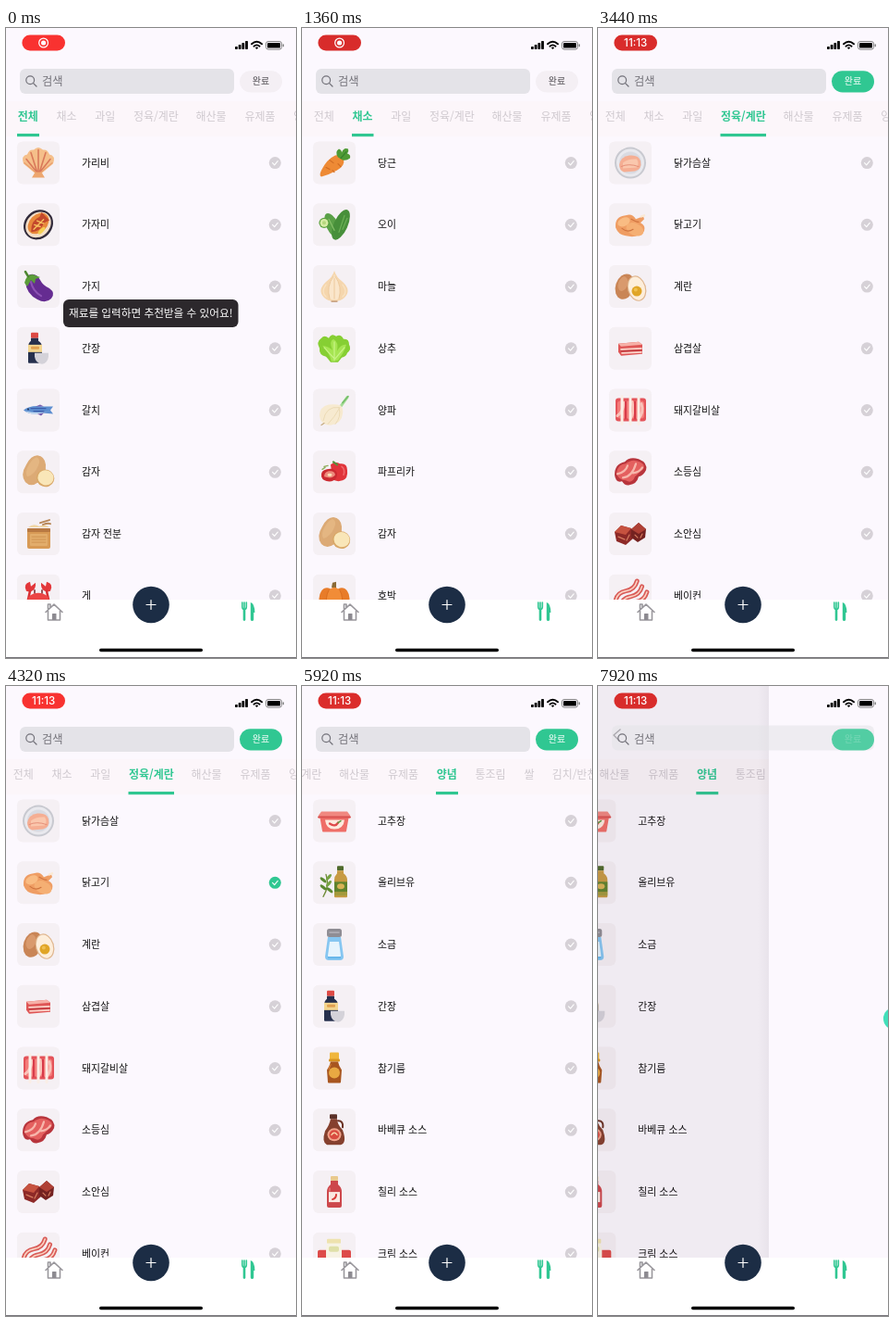
An HTML page that plays this animation: 314x680 px, repeating every 8 s.

```html
<!DOCTYPE html>
<html lang="ko">
<head>
<meta charset="utf-8">
<style>
html, body { margin: 0; width: 100%; height: 100%; overflow: hidden; background: #fcf8fe; }
svg { display: block; width: 100vw; height: 100vh; }
text { font-family: "Noto Sans CJK KR", "Noto Sans CJK", "Noto Sans", sans-serif; }
</style>
</head>
<body>
<svg id="stage" viewBox="0 0 314 680"></svg>
<script>
const LOOP = 8000, STEP = 80, W = 314, ROW = 66.75;
const GREEN = '#30c792', PAGE = '#fcf8fe', GREY = '#d6d1d7', TAB = '#cfc9cf';

const path = (d, fill) => `<path d="${d}" fill="${fill}"/>`;
const line = (d, color, w = 1) =>
  `<path d="${d}" fill="none" stroke="${color}" stroke-width="${w}" stroke-linecap="round" stroke-linejoin="round"/>`;
const oval = (x, y, rx, ry, fill, turn = 0) =>
  `<ellipse rx="${rx}" ry="${ry}" fill="${fill}" transform="translate(${x} ${y}) rotate(${turn})"/>`;
const rect = (x, y, w, h, r, fill) =>
  `<rect x="${x}" y="${y}" width="${w}" height="${h}" rx="${r}" fill="${fill}"/>`;
const text = (x, y, size, str, fill, more = '') =>
  `<text x="${x}" y="${y}" font-size="${size}" fill="${fill}" ${more}>${str}</text>`;
const group = (body, more = '') => `<g ${more}>${body}</g>`;
const turn = (deg, body) => group(body, `transform="rotate(${deg})"`);

// Each icon is drawn around its own centre, about 34 px wide.
const icons = {
  scallop: path('M-6 15L-4 11L-16 1Q-19-8-12-9Q-10-15-5-14Q0-19 5-14Q10-15 12-9Q19-8 16 1L4 11L6 15Z', '#f5bf8a') +
    line('M-1 11L-13-4M-1 11L-8-11M0 11V-14M1 11L8-11M1 11L13-4', '#d9795a', 1.6) +
    line('M-3 10L-15 0M3 10L15 0', '#e79a69', 1.2) + path('M-7 16L-3 10H3L7 16Z', '#eda66f'),
  flounder: turn(-45, oval(0, 0, 17, 15, '#322b3b') + oval(0, 0, 15, 12.5, '#f4dfc9') +
    oval(1, -1, 13, 9.5, '#e8893c') + path('M-11 0Q-3-9 7-5L12-7V5L6 3Q-4 7-11 0', '#c3482c') +
    line('M-7 0H8M-3-3L0 3M2-4L5 3', '#f7c25f', 1.4) + oval(-2, 7, 5, 2, '#f5cf56')),
  eggplant: path('M-11-12Q-3-16 2-7Q5-1 12 2Q19 7 14 13Q8 19-1 14Q-13 8-14-5Z', '#652c91') +
    line('M-8-5Q-6 5 3 10', '#8d52b4', 2.2) + path('M-15-4Q-13-13-6-13L2-10L-3-8L-4-3L-8-7L-12 0Z', '#5b9d39') +
    line('M-11-11L-14-16', '#4c862f', 2.6),
  soy: rect(-8, -17, 8, 6, 1, '#dd4a45') + path('M-8-11H0V-8Q4-6 4-1V15Q4 16 3 16H-10Q-11 16-11 15V-1Q-11-6-8-8Z', '#26304d') +
    rect(-11, -4, 15, 8, 0, '#f3d58f') + rect(-8, -2, 9, 3, 1, '#e0a050') +
    path('M-4 5H11V9Q10 16 4 17Q-3 16-4 9Z', '#d4d2d9'),
  fish: path('M-16 0Q-9-6 5-4L16-4L13 0L16 4L4 3Q-9 6-16 0', '#5d8fd0') +
    path('M-14 1Q0 4 13 1L4 3Q-8 6-14 1', '#c6dcf0') + line('M-8-2H8M-5 1H6', '#3d5eaa', 1.2) +
    path('M-3-4L2-6L6-4ZM-1 4L3 6L6 3Z', '#775fae') + oval(-11, -1, 1, 1, '#1f3157'),
  potato: path('M-1-18Q7-17 8-8Q9 4 0 11Q-8 17-14 11Q-20 3-13-8Q-8-18-1-18', '#dcaa75') +
    path('M-2-16Q3-14 0-7Q-4 3-12 5Q-15 0-10-8Q-6-15-2-16', '#e4b682') +
    oval(7.5, 6.5, 9.8, 9.3, '#d9a868', 20) + oval(8, 6, 8.6, 8.1, '#f9e6b8', 20),
  starch: line('M2-12L12-15M5-10Q10-12 13-11', '#b88757', 2) + rect(-12, -6, 25, 22, 2, '#d89a55') +
    rect(-12, -6, 25, 4, 1, '#b87942') + rect(-9, 0, 19, 13, 1, '#e2ad6b') +
    line('M-7 3H8M-7 6H8M-7 9H8', '#c98c4c', .8) + path('M-11-7Q-5-12 1-8Q8-11 12-7Z', '#f1d7a6'),
  crab: path('M-13-5Q-17-13-9-15L-8-10L-3-14Q-2-6-9-4ZM13-5Q17-13 9-15L8-10L3-14Q2-6 9-4Z', '#e3373a') +
    line('M-9-5L-11 4M9-5L11 4M-11 8L-17 11M11 8L17 11', '#d52e33', 2.5) + oval(0, 5, 12, 8, '#ec4545') +
    line('M-4-3V-6M4-3V-6', '#7b2024', 1.5),
  carrot: path('M1-8Q8-10 10-4Q12 3 3 8Q-6 13-14 15Q-17 14-14 8Q-8-4 1-8', '#ee8a35') +
    line('M-5-3L-1 0M-9 5L-5 7M4 1L7 4M-2 8L0 10', '#d06b22', 1.1) +
    path('M4-6Q0-12 5-15Q8-14 8-11Q10-17 15-15Q16-13 14-10Q18-9 17-5Q13-2 9-3Z', '#4f9a35') + line('M7-5L13-12', '#36802a', 1.2),
  cucumber: oval(-2, 1, 6.5, 14.5, '#5aa047', -26) + oval(7, 0, 7.5, 17.5, '#478f3a', 24) +
    line('M11-10L5 8M14-7L9 5', '#6db057', 1.2) + line('M-6-6L0 6', '#86bf68', 1.2) + oval(-11, -2, 5.6, 5.6, '#5ba13f') +
    oval(-11, -2, 4.4, 4.4, '#d7eba5') + oval(-11, -2, 2, 2, '#b5d77d'),
  garlic: path('M0-17Q2-10 9-5Q19 4 11 12Q7 16 0 16Q-7 16-11 12Q-19 4-9-5Q-2-10 0-17', '#f5d6ad') +
    path('M0-13Q9-2 5 13Q0 16-5 13Q-9-2 0-13', '#fae6cb') + line('M-1-11Q-9 0-5 13M1-11Q9 0 5 13M0-9V13', '#ebc799', .9) +
    line('M-9-2Q-15 6-9 11M9-2Q15 6 9 11', '#f9e2c2', 1.3) + line('M-3 16H3', '#b98c65', 1.3),
  lettuce: path('M-4 15Q-7 11-9 9Q-17 7-16 0Q-20-7-14-11Q-11-15-6-11Q-3-17 2-13Q7-16 10-10Q16-11 16-4Q19 1 14 5Q13 9 8 10L4 15Z', '#86cf33') +
    path('M-3 14Q-6 4-13-3Q-6-2-2 2Q-6-8-1-10Q5-7 3 3Q7-5 13-4Q11 4 4 13Z', '#a6e552') +
    line('M0 13V-7M0 11L-11-1M1 11L11-1', '#c9f488', 1.2),
  onion: line('M6-3L14-14', '#a4dc96', 3) + line('M9-8L15-15', '#74bd68', 1.6) +
    path('M7-5Q10-1 9 4Q8 14-3 16Q-15 17-16 6Q-16-4-6-6Q2-7 7-5', '#f7ead0') +
    line('M5-3Q-9-5-12 11M6-3Q0 8-7 15M5-3Q8 7 1 15', '#ead9b2', .9) + line('M-11 14L-14 16', '#c5a97a', 1.2),
  pepper: path('M-4-8Q1-12 6-9Q14-10 14-2Q15 7 9 9Q3 11-2 8Z', '#e0343a') + line('M3-8L-1-11', '#55913b', 2.2) +
    line('M8-6Q12-3 10 3', '#f0686b', 1.6) + path('M-14 5Q-15-2-8-3Q0-5 3 1Q4 8-3 10Q-12 11-14 5', '#cb2a31') +
    path('M-11 5Q-11 0-6-1Q0-2 1 3Q-2 8-11 5', '#ee8a7c') + oval(-5, 3, 2.5, 1.7, '#fae2b8') +
    line('M-11-6L-7-7M-13-3L-10-5', '#8fae5c', 1.4),
  pumpkin: path('M-3-9L-2-14L2-15L2-8Z', '#8a6a35') + oval(-8, 3, 8.5, 11.5, '#e87c29') + oval(8, 3, 8.5, 11.5, '#e87c29') +
    oval(0, 3, 8, 12, '#f18c37') + line('M-6-6Q-11 3-7 12M6-6Q11 3 7 12', '#d96e20', .9),
  breast: oval(0, 0, 17, 17, '#c8c9d0') + oval(0, 0, 15, 15, '#e9e9ee') + oval(0, 0, 12, 12, '#d9dae1') +
    path('M-12 2Q-10-7-1-8Q9-9 11-2Q13 7 5 9L-7 10Q-12 8-12 2', '#f5ae93') +
    path('M-8 0Q-2-5 7-4Q10 1 7 5L-8 6Z', '#fac7ad') + line('M-10 4Q-2 0 9 4', '#e58f78', 1),
  chicken: path('M-16 3Q-17-9-5-10Q2-13 6-6L14-9L15-6L11-2Q17 1 15 7Q8 15-5 12Q-13 11-16 3', '#ef9d63') +
    oval(5, 5, 10, 6.5, '#f5af73', 25) + oval(-7, -3, 7, 4.5, '#f9bc83', -25) + line('M-9 4Q-3 9 3 5M1-6Q6-3 9-3', '#cf743f', 1.2) +
    line('M12-9L15-10', '#fbe9d4', 2.5),
  egg: oval(-6, 0, 10, 14, '#c98556', 18) + oval(-8, -3, 5, 8, '#d99a6d', 18) +
    oval(7, 2, 10, 14, '#e0b68f', -16) + oval(7, 2, 8.8, 12.8, '#fdeedb', -16) +
    oval(7, 5, 5.5, 5.5, '#e0a526') + oval(5.8, 3.5, 2, 2, '#f0c04f'),
  belly: path('M-13-5L9-7L13-4V6L-10 8L-13 4Z', '#df5656') + path('M-13-5L9-7L13-4L-10-2Z', '#f6b0a7') +
    line('M-10 1L12 0M-9 5L12 4', '#fbd5cb', 1.7) + line('M-10 3L12 2', '#bc383d', 1.2),
  ribs: rect(-16, -13, 33, 25, 3, '#e45359') + rect(-14, -10, 29, 19, 3, '#f47b79') +
    line('M-14 6Q-8 2-7-8M0 9Q5 3 2-9M9 9Q15 2 12-7', '#fac2b9', 3) + line('M-9-15V15M0-15V15M9-15V15', '#faeee6', 3) +
    line('M-5-9V9M5-9V9', '#d73a49', 2),
  sirloin: path('M-17 3Q-17-9-6-11Q-1-17 9-14Q19-10 17-2Q14 4 9 5Q7 13-1 14Q-6 15-9 10Q-16 12-17 3', '#b8353c') +
    path('M-15 1Q-13-9-5-9Q2-15 10-11Q17-8 14-3Q8 2 5 5Q2 13-5 9Q-13 9-15 1', '#e4605f') +
    line('M-14 2Q-5 0-3-7M-8 6Q2 5 6-9M3 1Q10 0 13-5', '#f7b6ab', 2.2),
  loin: path('M-17-2L-10-9L1-6L3 5L-5 12L-15 8Z', '#8d2927') + path('M-17-2L-10-9L1-6L-5 1Z', '#c6523f') +
    path('M1-5L9-12L17-5L16 4L8 9L1 4Z', '#742120') + path('M1-5L9-12L17-5L9 0Z', '#af4035') +
    line('M-13 3L-6 6M-1 1L-4 7M5 1L8 4M13 0L11 4', '#d67d60', 1.2),
  bacon: turn(-42, [-7, 1, 9].map(y => line(`M-15 ${y}Q-8 ${y - 5} 0 ${y}T16 ${y}`, '#d95c58', 5) +
    line(`M-15 ${y}Q-8 ${y - 5} 0 ${y}T16 ${y}`, '#fbd2c2', 1.6)).join('')),
  gochujang: path('M-16-6H16L13 11Q13 12 12 12H-12Q-13 12-13 11Z', '#ef6e67') + path('M-14-10H14L17-6V-3H-17V-6Z', '#f08880') +
    line('M-17-4H17', '#d9504e', 2) + path('M-10-1H11Q10 9 0 9Q-9 9-10-1', '#fdeade') +
    line('M-5 3Q1 7 4 2', '#e0494a', 2.4) + line('M4 2L7 0', '#5b9c42', 1.5),
  olive: line('M-12 15Q-5 4-9-9', '#6e8b36', 1.3) +
    [[-12, 5], [-6, 1], [-12, -3], [-6, -6], [-5, 8]].map(([x, y], i) => oval(x, y, 4.2, 1.6, i % 2 ? '#76a242' : '#5b8931', i % 2 ? -50 : 40)).join('') +
    rect(3, -18, 7, 5, 1, '#4f6a2b') + path('M3-13H10V-10Q14-7 14-3V15Q14 16 13 16H1Q0 16 0 15V-3Q0-7 3-10Z', '#c79a42') +
    rect(0, -1, 14, 11, 0, '#5f832d') + oval(7, 4, 4, 3, '#d8b356') + rect(0, 10, 14, 4, 0, '#a39a3d'),
  salt: path('M-7-8H7L10 13Q10 17 6 17H-6Q-10 17-10 13Z', '#86c6f1') + path('M-5-3H5L7 12Q7 14 5 14H-5Q-7 14-7 12Z', '#e6f4fd') +
    path('M-7 13H7V15H-7Z', '#62b4ea') + rect(-8, -17, 16, 9, 2.5, '#8f8d94') + line('M-5-13H5', '#b5b3ba', 1.5),
  sesame: rect(-5, -17, 10, 8, 1, '#f0b63c') + rect(-6, -10, 12, 3, 1, '#d79421') +
    path('M-4-7H4Q5-2 8 2L7 15Q7 16 6 16H-6Q-7 16-7 15L-8 2Q-5-2-4-7', '#a8561f') +
    oval(0, 5, 6, 6, '#e8a942') + line('M-4-4L-6 1', '#cf7b36', 1.4),
  bbq: rect(-5, -17, 8, 5, 1, '#5a3027') + path('M-4-12H3Q3-6 9 0Q14 14 7 16H-8Q-14 13-10 1Q-5-6-4-12', '#85402e') +
    line('M4-10Q10-10 9-3', '#693022', 2) + oval(0, 5, 7.5, 7, '#f1a38a') + oval(0, 5, 5.5, 5, '#d94b40') + line('M-3 5Q0 1 3 5', '#f8d4a7', 1.5),
  chili: rect(-4, -17, 8, 5, 1, '#e9c98c') + path('M-4-12H4V-8Q8-5 8 0V15Q8 17 6 17H-6Q-8 17-8 15V0Q-8-5-4-8Z', '#cd474b') +
    rect(-6, 0, 12, 11, 0, '#fbe9e2') + line('M-2 8Q2 7 2 3', '#d83a36', 2) + line('M-5-4V-1', '#e88280', 1.3),
  cream: rect(-18, -4, 36, 18, 2, '#dd4b49') + rect(-8, -16, 15, 5, 1, '#eee2ae') +
    path('M-7-11H6Q8-9 8-5V14H-9V-5Q-9-9-7-11', '#f7f3e4') + rect(-6, -8, 11, 6, 2, '#dfe0a8')
};

const lists = [
  [['가리비', 'scallop'], ['가자미', 'flounder'], ['가지', 'eggplant'], ['간장', 'soy'],
   ['갈치', 'fish'], ['감자', 'potato'], ['감자 전분', 'starch'], ['게', 'crab']],
  [['당근', 'carrot'], ['오이', 'cucumber'], ['마늘', 'garlic'], ['상추', 'lettuce'],
   ['양파', 'onion'], ['파프리카', 'pepper'], ['감자', 'potato'], ['호박', 'pumpkin']],
  [['닭가슴살', 'breast'], ['닭고기', 'chicken'], ['계란', 'egg'], ['삼겹살', 'belly'],
   ['돼지갈비살', 'ribs'], ['소등심', 'sirloin'], ['소안심', 'loin'], ['베이컨', 'bacon']],
  [['고추장', 'gochujang'], ['올리브유', 'olive'], ['소금', 'salt'], ['간장', 'soy'],
   ['참기름', 'sesame'], ['바베큐 소스', 'bbq'], ['칠리 소스', 'chili'], ['크림 소스', 'cream']]
];
const tabs = [['전체', 12.8], ['채소', 54.5], ['과일', 96.3], ['정육/계란', 138], ['해산물', 205.5],
  ['유제품', 258.5], ['양념', 311.3], ['통조림', 353], ['쌀', 406], ['김치/반찬', 436.3]];

// Which list opens when, with its tab and underline.
const views = [
  { at: 0, tab: 0, x: 12, w: 24 },
  { at: 640, tab: 1, x: 54, w: 23.5 },
  { at: 3040, tab: 3, x: 137.5, w: 49.5 },
  { at: 5520, tab: 6, x: 310.5, w: 24 }
];
const checks = [[1, 2, 1600], [1, 4, 2080], [2, 1, 3920]];
const scrolls = [[3040, 3360, -5], [4560, 5040, -82.5], [5520, 5840, -165.5]];
const PUSH = 7760;

const item = ([name, icon], i) => {
  const y = 145.6 + i * ROW;
  return rect(12, y - 23, 46, 46, 6, '#f5f0f4') + group(icons[icon], `transform="translate(35 ${y})"`) +
    text(82, y + 4, 10.9, name, '#111', 'font-weight="500"') +
    `<circle class="check" cx="291.3" cy="${y}" r="6.5" fill="${GREY}"/>` +
    line(`M288.6 ${y}L290.7 ${y + 2.2}L294.2 ${y - 2}`, '#fff', 1.1);
};

const statusBar = rect(17.4, 7.4, 46.6, 17, 8.5, '#ff3331').replace('<rect', '<rect id="pill"') +
  group('<circle cx="40.6" cy="16" r="4.9" fill="none" stroke="#fff" stroke-width="1.2"/>' + oval(40.6, 16, 2.6, 2.6, '#fff'), 'id="rec"') +
  text(40.7, 20.1, 11.6, '11:13', '#fff', 'id="clock" text-anchor="middle" style="font-family:Inter,sans-serif" font-weight="500"') +
  [0, 1, 2, 3].map(i => rect(248 + i * 3.7, 20 - i * 2, 2.8, 3 + i * 2, .7, '#000')).join('') +
  line('M266 17.3Q271.5 12.3 277 17.3', '#000', 2) + line('M268.4 19.7Q271.5 17 274.6 19.7', '#000', 1.8) +
  path('M269.8 21.2Q271.5 20 273.2 21.2L271.5 23Z', '#000') +
  '<rect x="281.5" y="14.5" width="17" height="8.6" rx="2.5" fill="none" stroke="#777" stroke-width=".9"/>' +
  rect(283, 16, 14, 5.6, 1.2, '#000') + rect(299.6, 17.3, 1.3, 3, .6, '#777');

const header = rect(15, 44, 232, 27, 6, '#e4e3e8').replace('<rect', '<rect id="field"') +
  line('M24 47L17 53L23 59', '#8f8c94', 1.4).replace('<path', '<path id="back"') +
  '<circle cx="26.2" cy="56.2" r="4.4" fill="none" stroke="#73727a" stroke-width="1.2"/>' +
  line('M29.6 59.6L33 63', '#73727a', 1.3) + text(39, 62, 12.3, '검색', '#74737a') +
  group(rect(253, 46.2, 46, 23.2, 11.6, '#f4eff4') + text(276, 61.4, 10, '완료', '#4c494e', 'text-anchor="middle" font-weight="500"'), 'id="done"');

const footer = rect(0, 617, W, 63, 0, '#fff') +
  line('M43 630.5L52 622.2L61 630.5M45.5 629V639H58.5V629M45.5 627V622H48V625', '#99979c', 1.6) + rect(50, 632, 4.5, 7, .5, '#8d8b91') +
  oval(157, 622.5, 19.8, 19.8, '#1c2d45') + line('M152 622.5H162M157 617.5V627.5', '#fff', 1.2) +
  line('M255.8 620V625Q256 627.5 258 627.5Q260.2 627.5 260.3 625V620M258 620V626', GREEN, 1.6) +
  line('M258 628V638.6', GREEN, 2.6) + path('M264.8 620Q269.2 621 269.4 631H268.2V638.5Q268 640 266.5 640Q265 640 264.8 638.5Z', GREEN) +
  rect(101, 669.7, 112, 3.5, 1.75, '#000') + rect(0, 679, W, 1, 0, '#77757a');

const toast = group(rect(62, 293, 189.5, 30, 6, '#282428') +
  text(156.7, 312.2, 11.65, '재료를 입력하면 추천받을 수 있어요!', '#fff', 'text-anchor="middle"'), 'id="toast"');

const stage = document.getElementById('stage');
stage.innerHTML = `<defs>
  <clipPath id="body"><rect y="117" width="${W}" height="500"/></clipPath>
  <linearGradient id="edge"><stop stop-color="#746a7c" stop-opacity="0"/><stop offset="1" stop-color="#746a7c" stop-opacity=".06"/></linearGradient>
  </defs>` + rect(0, 0, W, 680, 0, PAGE) +
  group(rect(0, 79, W, 38, 0, '#fcf6fa') +
    group(tabs.map(([name, x]) => text(x, 100.3, 12, name, TAB, 'class="tab"')).join('') +
      rect(12, 114, 24, 3.2, 0, GREEN).replace('<rect', '<rect id="mark"'), 'id="tabs"') +
    group(lists.map(list => group(list.map(item).join(''), 'class="list"')).join(''), 'clip-path="url(#body)"'), 'id="page"') +
  rect(0, 0, W, 617, 0, '#483050').replace('<rect', '<rect id="dim"') +
  group(rect(-12, 0, 12, 617, 0, 'url(#edge)') + rect(0, 0, W, 617, 0, PAGE) + rect(124, 347, 66, 24, 12, '#42dfba'), 'id="next"') +
  header + statusBar + footer + toast;

const $ = id => document.getElementById(id);
const all = name => [...stage.querySelectorAll(name)];
const tabEls = all('.tab'), listEls = all('.list');
const checkEls = listEls.map(el => [...el.querySelectorAll('.check')]);
const [doneBox, doneText] = $('done').children;
const part = (t, a, b) => Math.min(1, Math.max(0, (t - a) / (b - a)));
const easeOut = p => 1 - (1 - p) ** 3;
const set = (el, props) => { for (const k in props) el.setAttribute(k, props[k]); };

function draw(t) {
  const now = views.filter(v => t >= v.at).length - 1, view = views[now];
  listEls.forEach((el, i) => set(el, { display: i === now ? 'inline' : 'none' }));
  tabEls.forEach((el, i) => set(el, { fill: i === view.tab ? GREEN : TAB, 'font-weight': i === view.tab ? 700 : 500 }));
  set($('mark'), { x: view.x, width: view.w });

  let shift = 0;
  for (const [a, b, to] of scrolls) shift += (to - shift) * easeOut(part(t, a, b));
  set($('tabs'), { transform: `translate(${shift} 0)` });

  for (const [list, row, at] of checks) set(checkEls[list][row], { fill: t >= at ? GREEN : GREY });
  const ready = t >= checks[0][2];
  set(doneBox, { fill: ready ? GREEN : '#f4eff4' });
  set(doneText, { fill: ready ? '#fff' : '#4c494e' });
  set($('toast'), { opacity: .98 * (1 - part(t, 240, 560)) });

  const glow = (1 - Math.cos((t - 1360) / 2180 * Math.PI * 2)) / 2;
  set($('pill'), { fill: `rgb(${216 + 39 * glow},${44 + 7 * glow},${43 + 6 * glow})` });
  set($('rec'), { opacity: t < 1840 ? 1 : 0 });
  set($('clock'), { opacity: t < 1840 ? 0 : 1 });

  // The next page pushes in from the right over the current one.
  const p = .411 * Math.max(0, (t - PUSH) / 160) ** 1.8, moving = p > 0;
  set($('page'), { transform: `translate(${-.3 * W * p} 0)` });
  set($('next'), { transform: `translate(${W * (1 - p)} 0)`, display: moving ? 'inline' : 'none' });
  set($('dim'), { opacity: .16 * p });
  set($('field'), { width: moving ? 284 : 232, y: moving ? 42.5 : 44, opacity: 1 - 1.1 * p });
  set($('back'), { opacity: 1.7 * p });
  set($('done'), { opacity: 1 - .45 * p });
  set(doneText, { opacity: Math.max(0, 1 - 1.9 * p) });
}

function tick() {
  const t = performance.now() % LOOP;
  draw(Math.floor(t / STEP) * STEP);
  requestAnimationFrame(tick);
}
tick();
</script>
</body>
</html>
```
